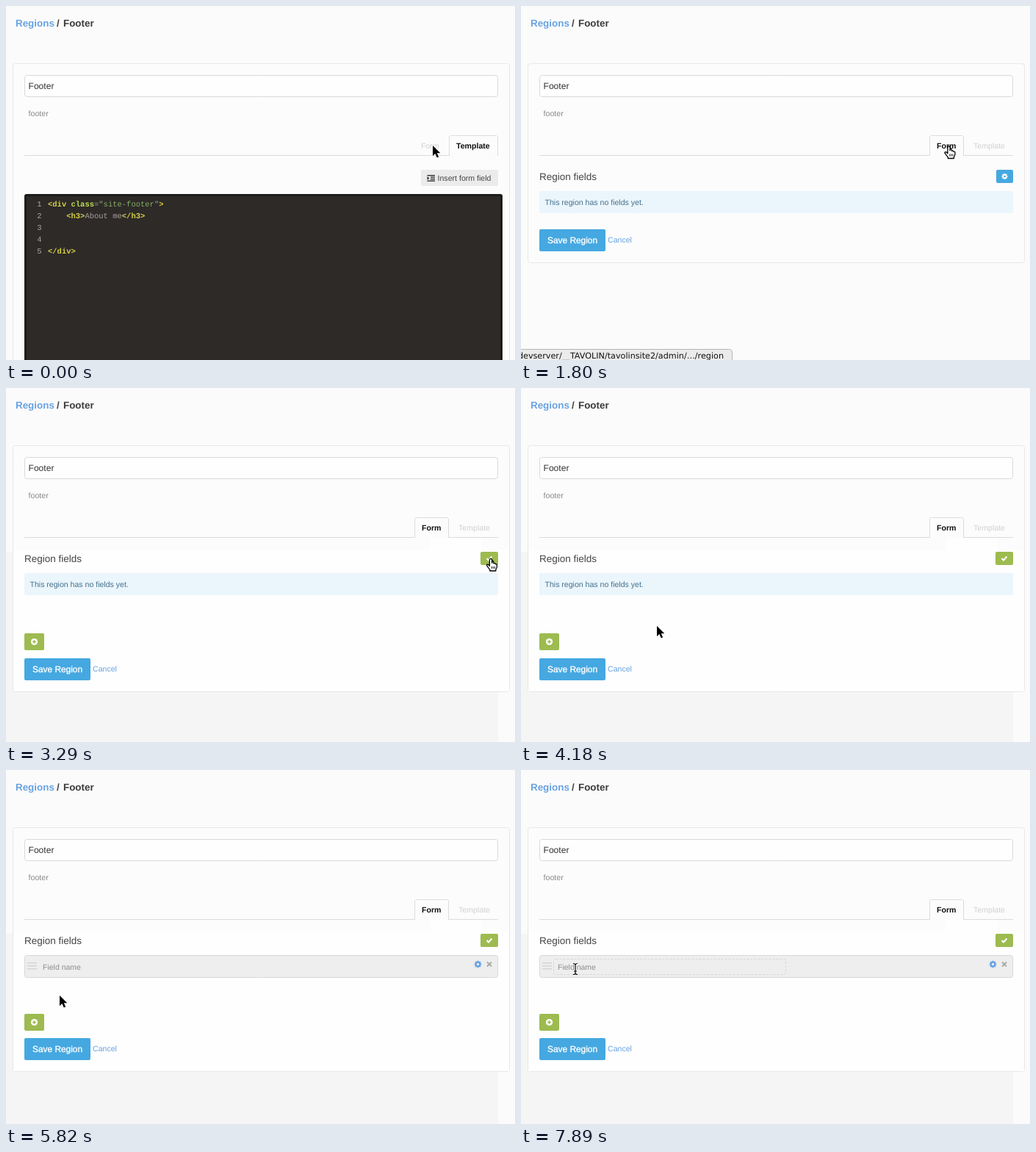
Recreate the animation shown at these times as an HTML page with a canvas. Size 693 by 482 pixels, loop 8000 ms.

```html
<!DOCTYPE html>
<html lang="en">
<head>
<meta charset="utf-8">
<title>Region editor</title>
<style>
  html, body { margin: 0; width: 100%; height: 100%; overflow: hidden; background: #fbfbfb; }
  canvas { display: block; }
</style>
</head>
<body>
<canvas id="stage" width="693" height="482"></canvas>
<script>
const ctx = document.getElementById('stage').getContext('2d');
const LOOP = 8000;
const SANS = '"Liberation Sans", Arial, sans-serif';
const MONO = '"Liberation Mono", monospace';
const BLUE = '#45a8e1', LINK = '#67a2e3', GREEN = '#9dbb50', LINE = '#dcdcdc';

// Start time, hot spot and shape of the pointer; each pose is held until the next.
const POINTER = [
  [0, 581, 190, 'arrow'],
  [1500, 582.5, 190.5, 'hand'],
  [2250, 588, 197, 'arrow'],
  [2400, 605, 203, 'arrow'],
  [2540, 634, 214, 'arrow'],
  [2690, 656, 228, 'hand'],
  [2840, 660, 232, 'hand'],
  [3430, 630, 241, 'arrow'],
  [3580, 576, 264, 'arrow'],
  [3880, 520, 274, 'arrow'],
  [4030, 365, 298, 'arrow'],
  [4180, 185, 324, 'arrow'],
  [4330, 75, 339, 'arrow'],
  [4480, 39, 341, 'hand'],
  [5820, 73, 307, 'arrow'],
  [5970, 106, 287, 'arrow'],
  [6110, 121, 280, 'arrow'],
  [6260, 95, 273, 'beam'],
  [6400, 74, 271, 'beam']
];
const CLICKS = [1650, 3140, 5080, 7150];

const ARROW = new Path2D('M0 0V14.2L3.3 11.1L5.8 16.6L8.2 15.5L5.8 10.2H10.3Z');
const HAND = new Path2D('M-1.6 1.6Q0-.8 1.6 1.6V6.2Q3-.2 4 6.8Q5.6 5.8 6.3 7.7Q8.4 7 8.4 9.2V12L6.9 15V17H-1.2V15.4L-3.6 12.4L-5.6 9.4Q-5 7.4-3 8.8L-1.6 10.4Z');
const FINGERS = new Path2D('M1.2 11V14M3.3 11V14M5.4 11V14');
const BEAM = new Path2D('M-3-7.5Q0-7.5 0-5.5Q0-7.5 3-7.5M0-5.5V5.5M-3 7.5Q0 7.5 0 5.5Q0 7.5 3 7.5M-2 3H2');

function text(string, x, y, size, color, weight = '', family = SANS, align = 'left') {
  ctx.font = `${weight} ${size}px ${family}`;
  ctx.textAlign = align;
  ctx.fillStyle = color;
  ctx.fillText(string, x, y);
}

function rect(x, y, w, h, color) {
  ctx.fillStyle = color;
  ctx.fillRect(x, y, w, h);
}

function box(x, y, w, h, radius, fill, stroke) {
  ctx.beginPath();
  ctx.roundRect(x, y, w, h, radius);
  ctx.fillStyle = fill;
  ctx.fill();
  if (stroke) outline(stroke);
}

function outline(color, width = 1, path) {
  ctx.strokeStyle = color;
  ctx.lineWidth = width;
  path ? ctx.stroke(path) : ctx.stroke();
}

function line(points, color, width) {
  ctx.beginPath();
  points.forEach(([x, y]) => ctx.lineTo(x, y));
  outline(color, width);
}

function disc(x, y, radius, color) {
  ctx.beginPath();
  ctx.arc(x, y, radius, 0, Math.PI * 2);
  ctx.fillStyle = color;
  ctx.fill();
}

function gear(x, y, radius, color, hole) {
  for (let i = 0; i < 4; i++) {
    const a = i * Math.PI / 4, dx = Math.cos(a) * radius, dy = Math.sin(a) * radius;
    line([[x - dx, y - dy], [x + dx, y + dy]], color, radius * .45);
  }
  disc(x, y, radius * .76, color);
  disc(x, y, radius * .34, hole);
}

function drawHeader() {
  text('Regions', 13, 28, 13.4, LINK, 'bold');
  text('/', 69, 28, 13.4, '#444', 'bold');
  text('Footer', 78, 28, 13.4, '#3b3b3b', 'bold');
}

function drawTop() {
  box(25.5, 94.5, 644, 29, 3, '#fefefe', '#d9d9d9');
  text('Footer', 30.5, 113, 12.1, '#333');
  text('footer', 30.5, 150, 10.7, '#8a8a8a');
}

function drawTabs(t) {
  const onForm = t >= 1800, hover = t >= 1500 && !onForm;
  if (hover) box(555, 176, 44, 27, [3, 3, 0, 0], '#f2f2f2');
  rect(25, 203, 645, 1, LINE);
  const [x, w] = onForm ? [556.5, 46] : [603.5, 66];
  box(x, 176.5, w, 28, [3, 3, 0, 0], '#fcfcfc');
  line([[x, 204], [x, 178], [x + 2, 176.5], [x + w - 2, 176.5], [x + w, 178], [x + w, 204]], LINE, 1);
  if (onForm) {
    text('Form', 566, 194, 10.6, '#111', 'bold');
    text('Template', 616, 194, 10.6, '#d0d0d0');
  } else {
    text('Form', 565, 194, 10.6, hover ? '#9697a3' : '#d0d0d0');
    text('Template', 613, 194, 10.6, '#111', 'bold');
  }
}

function drawCode() {
  const tag = '#d6cf45', attr = '#c0e04e', quote = '#86ad63', plain = '#a6a19e';
  const rows = [
    [['<div ', tag], ['class', attr], ['=', plain], ['"site-footer"', quote], ['>', tag]],
    [['    <h3>', tag], ['About me', plain], ['</h3>', tag]],
    [],
    [],
    [['</div>', tag]]
  ];
  box(565, 223, 105, 22, 2, '#ebebeb');
  [230, 232.5, 235, 237.5].forEach((y, i) => {
    const inner = i === 1 || i === 2;
    rect(inner ? 578 : 573.5, y, inner ? 6 : 10.5, 1.4, '#333');
  });
  ctx.fillStyle = '#333';
  ctx.fill(new Path2D('M573.5 232V237L576.5 234.5Z'));
  text('Insert form field', 587.5, 238, 10.6, '#444');

  box(25, 256, 651, 240, 3, '#1d1c1b');
  rect(28, 259, 645, 230, '#2d2a28');
  rows.forEach((row, i) => {
    const y = 273 + i * 16;
    let x = 57;
    text(i + 1, 48.5, y, 10.5, '#aaa6a3', '', MONO, 'right');
    for (const [part, color] of row) {
      const bold = color === tag || color === attr ? 'bold' : '';
      text(part, x, y, 10.5, color, bold, MONO);
      x += part.length * 6.3;
    }
  });
}

function drawField(t) {
  box(25.5, 252.5, 644, 30, 3, '#eee', '#d8d8d8');
  [262, 266, 270].forEach(y => rect(29, y, 13, 1.5, '#d5d5d5'));
  text('Field name', 50, 272, 10.5, '#8c8c8c');
  gear(642.5, 264.5, 4.8, LINK, '#eee');
  line([[655, 261.5], [661, 267.5]], '#aaa', 2);
  line([[661, 261.5], [655, 267.5]], '#aaa', 2);
  if (t < 7300) return;
  ctx.setLineDash([3, 2]);
  ctx.beginPath();
  ctx.roundRect(44.5, 257.5, 316, 21, 3);
  outline('#d6d6d6');
  ctx.setLineDash([]);
  if (t < 7890) rect(50, 262, 1, 12, '#222');
}

function drawForm(t) {
  const editing = t >= 3290, hasField = t >= 5230;
  text('Region fields', 25, 237, 13.5, '#444');
  if (editing) {
    box(646, 223, 24, 18, 2, GREEN);
    line([[654.5, 232], [657, 234.5], [661.5, 229.5]], '#fff', 2);
  } else {
    const color = t >= 2690 ? '#3b9bd3' : BLUE;
    box(647, 223, 23, 18, 2, color);
    gear(658.5, 232, 4, '#fff', color);
  }

  if (hasField) drawField(t);
  else {
    box(25, 252, 645, 30, 2, '#ebf5fc');
    text('This region has no fields yet.', 32.5, 271, 10.55, '#41708c');
  }

  if (editing) {
    const y = hasField ? 332 : 334;
    const color = t >= 4480 && t < 5820 ? '#86a142' : GREEN;
    box(25, y, 27, 23, 2, color);
    disc(38.5, y + 11.5, 4.6, '#fff');
    rect(36, y + 10.75, 5, 1.5, color);
    rect(37.75, y + 9, 1.5, 5, color);
  }

  const saveY = hasField ? 365 : editing ? 368 : 304;
  box(25, saveY, 90, 30, 2, BLUE);
  text('Save Region', 36, saveY + 19, 11.9, '#fff');
  ctx.strokeStyle = '#fff';
  ctx.lineWidth = .35;
  ctx.strokeText('Save Region', 36, saveY + 19);
  text('Cancel', 118, saveY + 18, 10.6, LINK);
}

function drawPage(t) {
  const editing = t >= 3290;
  rect(0, 0, 693, 482, '#fbfbfb');
  if (t >= 2840) rect(0, 223, 670, 259, '#f5f5f5');
  const bottom = t < 1800 ? 500 : !editing ? 349.5 : t < 5230 ? 413.5 : 410.5;
  box(9.5, 78.5, 676, bottom - 78.5, 3, '#fcfcfc', '#e8e8e8');
  if (editing) rect(10, 220, 675, bottom - 220.5, '#fefefe');
  drawHeader();
  drawTop();
  drawTabs(t);
  if (t >= 2840) rect(578, 204, 70, 16, '#fefefe');
  t < 1800 ? drawCode() : drawForm(t);
}

function drawStatus(t) {
  if (t < 1500 || t >= 2840) return;
  box(-3.5, 467.5, 291, 30, 4, '#ebebeb', '#b5b5b5');
  text('devserver/__TAVOLIN/tavolinsite2/admin/…/region', 276, 480, 11.2, '#111', '', '"DejaVu Sans", sans-serif', 'right');
}

function drawPointer(t) {
  const [, x, y, shape] = POINTER.findLast(pose => pose[0] <= t);
  if (CLICKS.some(start => t >= start && t < start + 145)) {
    ctx.beginPath();
    ctx.arc(x, y, 9.2, 0, Math.PI * 2);
    outline('#fff', 1.6);
    ctx.beginPath();
    ctx.arc(x, y, 10.3, 0, Math.PI * 2);
    outline('#111', 1.3);
  }
  ctx.save();
  ctx.translate(x, y);
  ctx.lineJoin = 'round';
  if (shape === 'arrow') {
    outline('#fff', 2.2, ARROW);
    ctx.fillStyle = '#000';
    ctx.fill(ARROW);
  } else if (shape === 'hand') {
    ctx.fillStyle = '#fff';
    ctx.fill(HAND);
    outline('#000', 1.3, HAND);
    outline('#000', .9, FINGERS);
  } else {
    outline('#fff', 2.4, BEAM);
    outline('#000', 1.2, BEAM);
  }
  ctx.restore();
}

function frame() {
  const t = performance.now() % LOOP;
  drawPage(t);
  drawStatus(t);
  drawPointer(t);
  requestAnimationFrame(frame);
}

ctx.textRendering = 'geometricPrecision';
frame();
</script>
</body>
</html>
```
